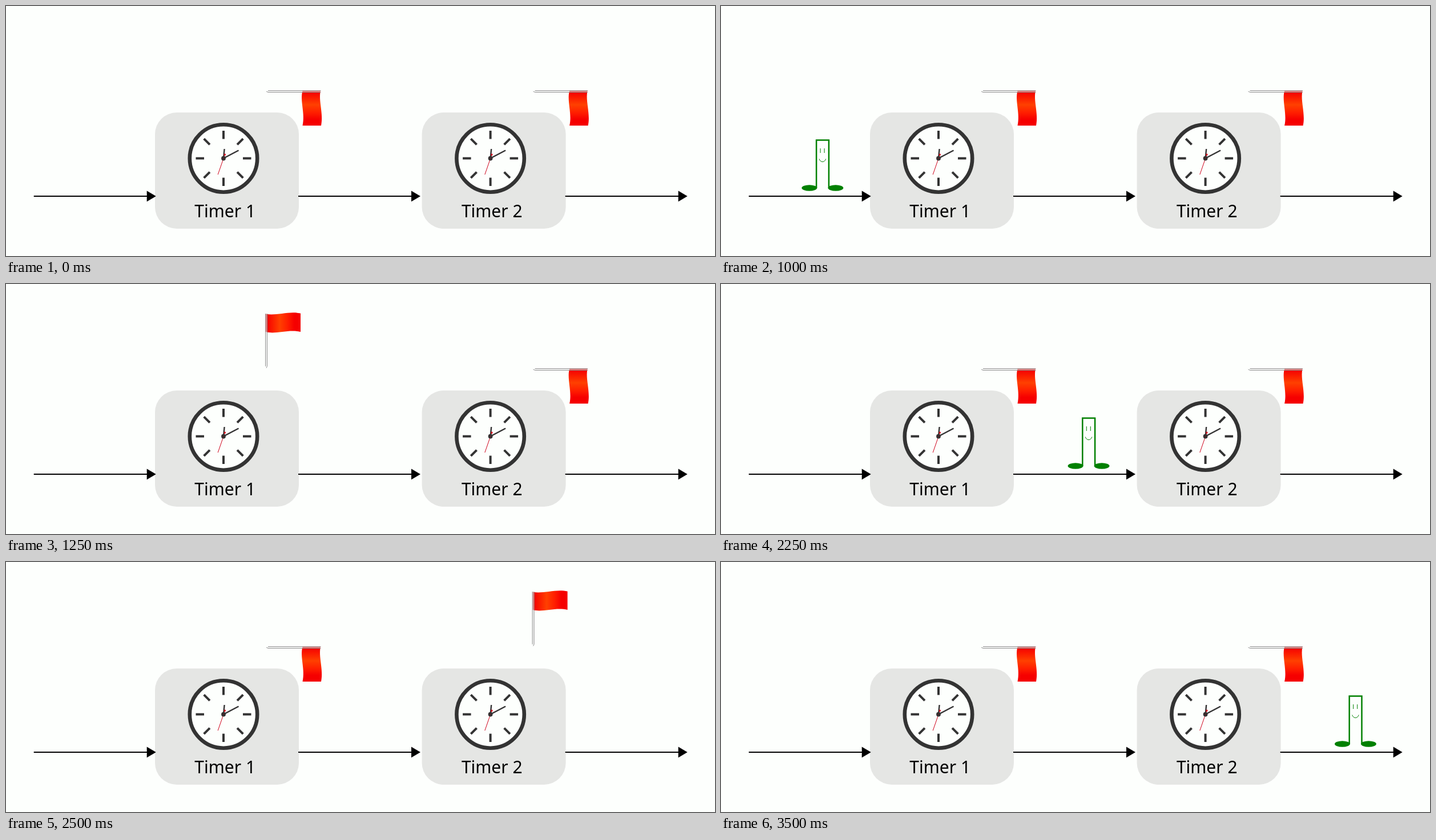
An HTML page that plays this animation: 1242 px wide and 439 px high, repeating every 3750 ms.

```html
<!DOCTYPE html>
<html lang="en">
<head>
<meta charset="utf-8">
<title>Two timers</title>
<style>
  html, body { margin: 0; width: 100%; height: 100%; overflow: hidden; background: #fdfffd; }
  svg { display: block; width: 100%; height: 100%; }
  text { font: 30px "Noto Sans", "Open Sans", sans-serif; }
</style>
</head>
<body>
<svg viewBox="0 0 1242 439">
  <defs>
    <linearGradient id="cloth">
      <stop offset="0" stop-color="#ec0000"/>
      <stop offset=".15" stop-color="#fa1400"/>
      <stop offset=".4" stop-color="#ff4000"/>
      <stop offset=".62" stop-color="#ff2000"/>
      <stop offset=".82" stop-color="#f60000"/>
      <stop offset="1" stop-color="#f40000"/>
    </linearGradient>

    <!-- The foot of the pole is the origin -->
    <g id="flag">
      <path d="M-1-95C16-91 39-100.500 60-96V-63.500C39-68.500 16-58.500-1-63.500Z" fill="url(#cloth)"/>
      <path d="M-1.500-95.500H1.500V-3L0 0L-1.500-3Z" fill="#e4e4e4" fill-opacity=".55"/>
      <path d="M-1.500-95.500V-3M1.500-95.500V-3L0 0" fill="none" stroke="#8c8c8c" stroke-width=".9"/>
    </g>

    <g id="clock">
      <circle r="59.200" fill="#fdfffd" stroke="#333" stroke-width="6.600"/>
      <g id="ticks" stroke="#333" stroke-width="4"></g>
      <path d="M0 0L1.600-16.500" stroke="#333" stroke-width="2.400"/>
      <path d="M0 0L26.500-14" stroke="#333" stroke-width="2.400"/>
      <path d="M2.700-7.500L-9.800 28.500" stroke="#d0021b" stroke-width="1"/>
      <circle cx="2.300" cy="-6.500" r="1.700" fill="#d0021b"/>
      <circle r="3.900" fill="#333"/>
      <circle r="1.200" fill="#5a1a22"/>
    </g>

    <g id="arrow">
      <path d="M0 0H200" stroke="#000" stroke-width="2"/>
      <path d="M198-9.500L214 0L198 9.500Z"/>
    </g>
  </defs>

  <rect width="1242" height="439" fill="#fdfffd"/>
  <g id="timers"></g>
  <use href="#arrow" x="48.700" y="334"/>
  <use href="#arrow" x="512" y="334"/>
  <use href="#arrow" x="979.700" y="334"/>
  <use class="flag" href="#flag"/>
  <use class="flag" href="#flag"/>

  <g id="pulse" fill="none" stroke="green">
    <path d="M81.500 320V235.500H103.300V320" stroke-width="2.500"/>
    <path d="M88.500 250V258M95.500 250V258M86.500 268.500C88.500 275.300 96 275.300 98 268.500"/>
    <g fill="green" stroke="none">
      <ellipse cx="69.200" cy="319.500" rx="13.400" ry="5.300"/>
      <ellipse cx="115.300" cy="319.500" rx="13.400" ry="5.300"/>
    </g>
  </g>
</svg>

<script>
const LOOP = 3750;
const STEP = 250;
const GAP = 467.6; // distance between the two timers

// Pulse offset for each visible step, keyed by step index
const pulseAt = { 3: 0, 4: 85.6, 8: 468.6, 9: 551.8, 13: 936, 14: 1019.2 };
// First and last step in which each flag is raised
const raised = [[5, 7], [10, 12]];

const pulse = document.getElementById("pulse");
const flags = document.querySelectorAll(".flag");

document.getElementById("ticks").innerHTML = Array.from({ length: 8 }, (_, i) =>
  `<path d="M0-34V-48.500" transform="rotate(${i * 45})"/>`).join("");

document.getElementById("timers").innerHTML = [1, 2].map((n, i) => `
  <g transform="translate(${i * GAP} 0)">
    <rect x="261" y="187" width="252" height="204" rx="38" fill="#e5e6e4"/>
    <use href="#clock" x="381" y="267.500"/>
    <text x="330.300" y="371">Timer ${n}</text>
  </g>`).join("");

function draw(time) {
  const step = Math.floor((time % LOOP) / STEP);
  const x = pulseAt[step];
  pulse.setAttribute("visibility", x === undefined ? "hidden" : "visible");
  pulse.setAttribute("transform", `translate(${x || 0} 0)`);

  flags.forEach((flag, i) => {
    const [first, last] = raised[i];
    const up = step >= first && step <= last;
    const pose = up ? "147.500)" : "150) rotate(90)";
    flag.setAttribute("transform", `translate(${456 + i * GAP} ${pose}`);
  });
}

const start = performance.now();
function tick() {
  draw(performance.now() - start);
  requestAnimationFrame(tick);
}
tick();
</script>
</body>
</html>
```
